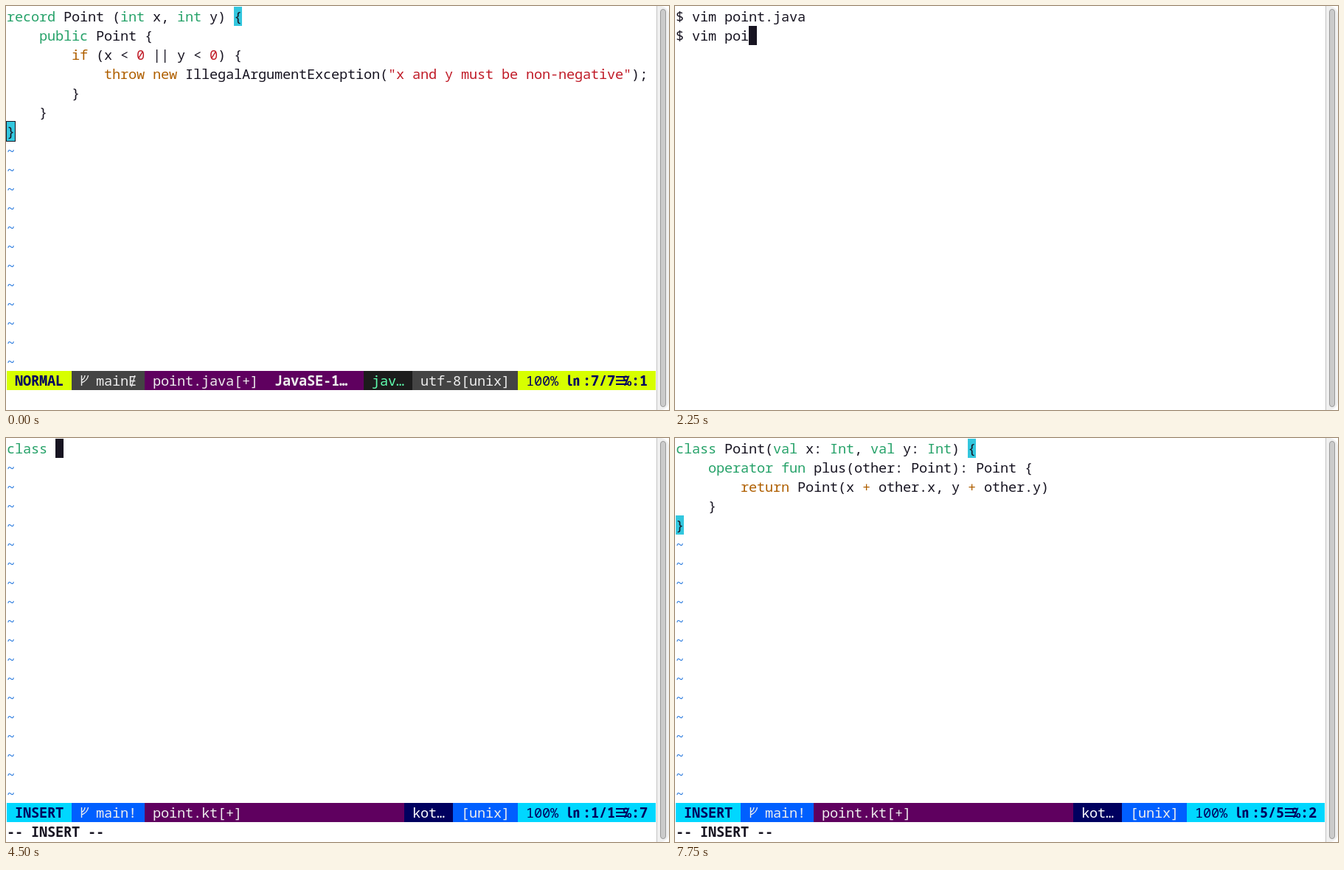
Recreate the animation shown at these times as an HTML page with a canvas. Size 899 px wide and 548 px high, loop 8000 ms.

```html
<!DOCTYPE html>
<html lang="en">
<head>
<meta charset="utf-8">
<title>Terminal session</title>
<style>
  html, body { margin: 0; width: 100%; height: 100%; overflow: hidden; background: #fff; }
  canvas { display: block; }
</style>
</head>
<body>
<canvas id="stage" width="899" height="548"></canvas>
<script>
const ctx = document.getElementById('stage').getContext('2d');
const LOOP = 8000, STEP = 250;
const CELL_W = 11, CELL_H = 26, COLS = 80, STATUS_ROW = 19, LAST_ROW = 20;
const FONT = '18.667px "Noto Sans Mono", "DejaVu Sans Mono", monospace';

const INK = '#171421', GREEN = '#26a269', BROWN = '#af5f00', RED = '#c01c28',
      BLUE = '#2a7bde', MATCH = '#33c7de';

const NORMAL = {
  name: 'NORMAL', a: ['#d7ff00', '#00005f'], b: ['#444444', '#eeeeee'], c: ['#1c1c1c', '#5fffaf']
};
const INSERT = {
  name: 'INSERT', a: ['#00d7ff', '#00005f'], b: ['#005fff', '#eeeeee'], c: ['#00005f', '#ffffff']
};
const MODIFIED = ['#5f005f', '#eeeeee'];

const JAVA = `record Point (int x, int y) {
    public Point {
        if (x < 0 || y < 0) {
            throw new IllegalArgumentException("x and y must be non-negative");
        }
    }
}`;
const KOTLIN = `class Point(val x: Int, val y: Int) {
    operator fun plus(other: Point): Point {
        return Point(x + other.x, y + other.y)
    }
}`;
const HEAD = 'class Point'.length;

const SYNTAX = [
  [/"[^"]*"?|\b0\b/g, RED],
  [/\b(record|public|int|class|val|operator|fun|Int)\b/g, GREEN],
  [/\b(if|throw|new|return)\b|\+/g, BROWN]
];

const cellX = col => 1 + col * CELL_W;
const cellY = row => 1 + row * CELL_H;

function fillCells(col, row, count, color) {
  ctx.fillStyle = color;
  ctx.fillRect(cellX(col), cellY(row), count * CELL_W, CELL_H);
}

function write(text, col, row, color = INK, bold = false) {
  ctx.font = (bold ? 'bold ' : '') + FONT;
  [...text].forEach((ch, i) => {
    if (ch === ' ') return;
    ctx.fillStyle = typeof color === 'string' ? color : color[i];
    ctx.fillText(ch, cellX(col + i), cellY(row) + 20);
  });
}

function cursor(col, row) {
  fillCells(col, row, 1, INK);
}

function writeCode(lines) {
  lines.forEach((line, row) => {
    const colors = Array(line.length).fill(INK);
    for (const [pattern, color] of SYNTAX)
      for (const hit of line.matchAll(pattern))
        colors.fill(color, hit.index, hit.index + hit[0].length);
    write(line, 0, row, colors);
  });
  for (let row = lines.length; row < STATUS_ROW; row++) write('~', 0, row, BLUE);
}

function branchMark(col, color) {
  const x = cellX(col), y = cellY(STATUS_ROW);
  ctx.strokeStyle = color;
  ctx.lineWidth = 1.4;
  ctx.beginPath();
  ctx.moveTo(x + 2.5, y + 6);
  ctx.lineTo(x + 2.5, y + 20);
  ctx.moveTo(x + 2.5, y + 12.5);
  ctx.quadraticCurveTo(x + 6.5, y + 11, x + 7, y + 6);
  ctx.moveTo(x + 2.5, y + 16);
  ctx.quadraticCurveTo(x + 10.5, y + 13, x + 11.5, y + 6);
  ctx.stroke();
}

function trigramMark(col, color) {
  ctx.fillStyle = color;
  for (let i = 0; i < 3; i++)
    ctx.fillRect(cellX(col) + 1, cellY(STATUS_ROW) + 7 + i * 5, 16, 2);
}

function positionInfo(col, [bg, fg], line, total, column) {
  const row = STATUS_ROW, counts = `:${line}/${total}`;
  fillCells(col, row, COLS - col, bg);
  write('100%', col + 1, row, fg);
  ctx.font = 'bold 18.667px "Noto Sans CJK SC", "Noto Sans CJK JP", "Noto Sans", sans-serif';
  ctx.fillStyle = fg;
  ctx.fillText('\u33d1', cellX(col + 6), cellY(row) + 20);
  write(counts, col + 8, row, fg, true);
  const next = col + 8 + counts.length;
  trigramMark(next, fg);
  write('\u2105:' + column, next + 1, row, fg, true);
}

function statusLine({ mode, branch, file, sdk, type, encoding, modified, line, total, column }) {
  const row = STATUS_ROW;
  const posCol = COLS - (12 + `:${line}/${total}`.length + `${column}`.length);
  const encCol = posCol - encoding.length - 2;
  const typeCol = encCol - type.length - 2;
  const fileColors = modified ? MODIFIED : mode.c;

  fillCells(0, row, 8, mode.a[0]);
  write(mode.name, 1, row, mode.a[1], true);
  fillCells(8, row, 9, mode.b[0]);
  branchMark(9, mode.b[1]);
  write(branch, 11, row, mode.b[1]);
  fillCells(17, row, typeCol - 17, fileColors[0]);
  write(file + (modified ? '[+]' : ''), 18, row, fileColors[1]);
  if (sdk) write(sdk, 33, row, fileColors[1], true);
  fillCells(typeCol, row, encCol - typeCol, mode.c[0]);
  write(type, typeCol + 1, row, mode.c[1]);
  fillCells(encCol, row, posCol - encCol, mode.b[0]);
  write(encoding, encCol + 1, row, mode.b[1]);
  positionInfo(posCol, mode.a, line, total, column);
}

function javaScene(command) {
  fillCells(28, 0, 1, MATCH);
  fillCells(0, 6, 1, MATCH);
  writeCode(JAVA.split('\n'));
  statusLine({
    mode: NORMAL, branch: 'main\u0246', file: 'point.java', sdk: 'JavaSE-1…', type: 'jav…',
    encoding: 'utf-8[unix]', modified: true, line: 7, total: 7, column: 1
  });
  if (command) {
    write(command, 0, LAST_ROW);
    cursor(command.length, LAST_ROW);
  } else {
    ctx.strokeStyle = INK;
    ctx.lineWidth = 1;
    ctx.strokeRect(cellX(0) - 0.5, cellY(6) - 0.5, CELL_W + 1, CELL_H + 1);
  }
}

function shellScene(typed) {
  write('$ vim point.java', 0, 0);
  write('$ ' + typed, 0, 1);
  cursor(2 + typed.length, 1);
}

function kotlinScene(mode, text, showCursor) {
  const lines = text.split('\n');
  const row = lines.length - 1, col = lines[row].length;
  if (text === KOTLIN) {
    fillCells(lines[0].length - 1, 0, 1, MATCH);
    fillCells(0, row, 1, MATCH);
  }
  writeCode(lines);
  statusLine({
    mode, branch: 'main!', file: 'point.kt', type: 'kot…', encoding: '[unix]',
    modified: text !== '', line: text ? lines.length : 0, total: lines.length, column: col + 1
  });
  if (mode === INSERT) write('-- INSERT --', 0, LAST_ROW, INK, true);
  else write('"point.kt" [New]', 0, LAST_ROW);
  if (showCursor) cursor(col, row);
}

function typedKotlin(time) {
  if (time <= 5250) return KOTLIN.slice(0, Math.round(HEAD * (time - 3750) / 1500));
  const share = Math.min(1, (time - 5250) / 750);
  return KOTLIN.slice(0, HEAD + Math.round((KOTLIN.length - HEAD) * share));
}

function scrollbar() {
  ctx.fillStyle = '#f0f0f0';
  ctx.fillRect(883, 0, 16, 548);
  ctx.fillStyle = '#c4c4c4';
  ctx.fillRect(882, 0, 1, 548);
  ctx.beginPath();
  ctx.roundRect(887.5, 4.5, 7, 539, 3.5);
  ctx.fillStyle = '#cbcbcb';
  ctx.fill();
  ctx.strokeStyle = '#999999';
  ctx.lineWidth = 1;
  ctx.stroke();
}

function draw(time) {
  ctx.fillStyle = '#fff';
  ctx.fillRect(0, 0, 899, 548);
  ctx.save();
  ctx.beginPath();
  ctx.roundRect(0, 0, 899, 548, 12);
  ctx.clip();
  scrollbar();
  if (time < 1000) javaScene(':wq'.slice(0, time / STEP));
  else if (time < 3250) shellScene('vim point.kt'.slice(0, Math.floor((time - 1000) / STEP * 1.5)));
  else if (time < 3500) write('"point.kt" [New]', 0, LAST_ROW);
  else if (time < 3750) kotlinScene(NORMAL, '', true);
  else kotlinScene(INSERT, typedKotlin(time), time < 6000 || time % 500 === 0);
  ctx.restore();
}

function tick(now) {
  draw(Math.floor(now % LOOP / STEP) * STEP);
  requestAnimationFrame(tick);
}
draw(0);
requestAnimationFrame(tick);
</script>
</body>
</html>
```
